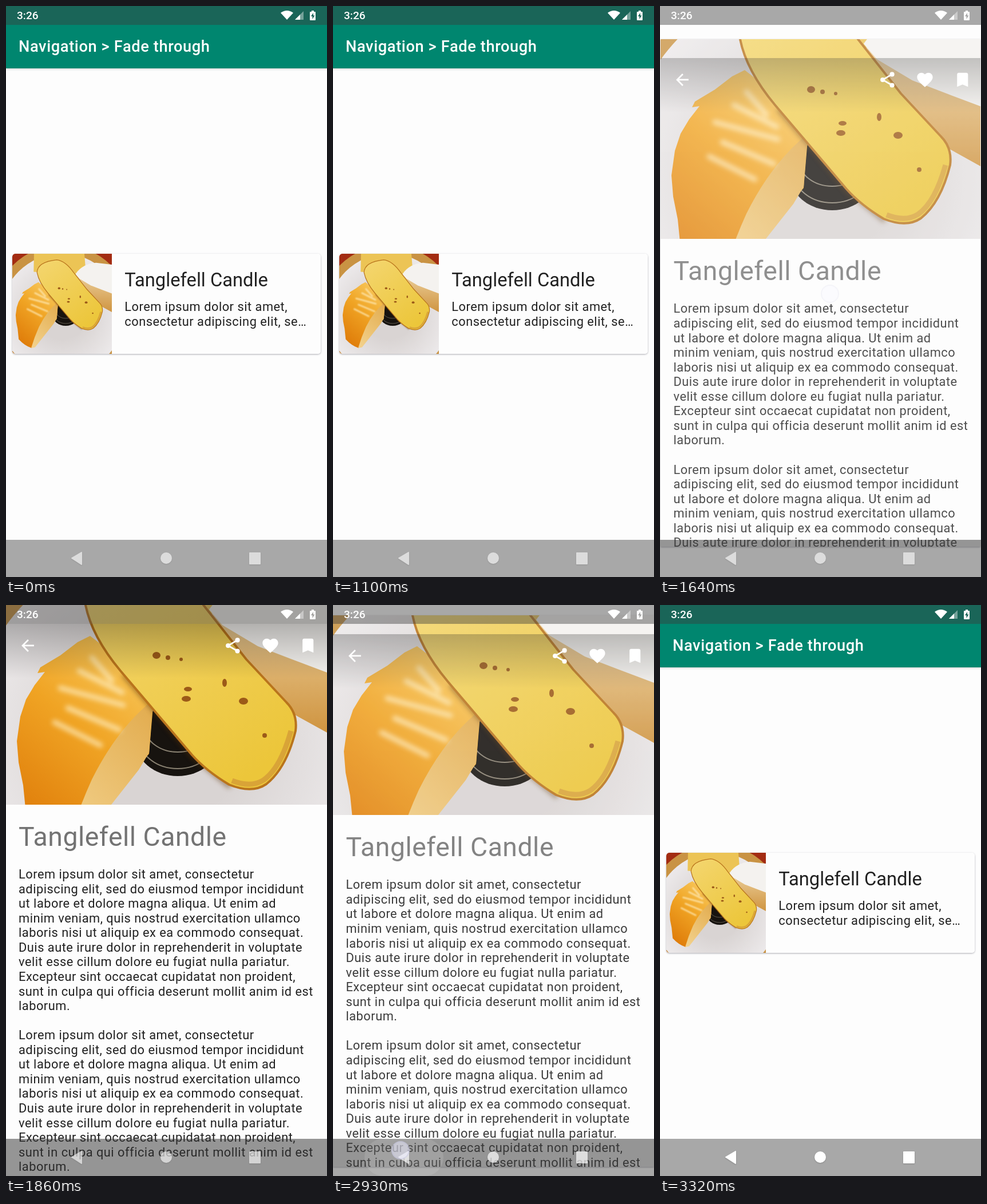
Recreate the animation shown at these times as an HTML page. Size 561x998 px, loop 3.58 s.

```html
<!DOCTYPE html>
<html lang="en">
<head>
<meta charset="utf-8">
<title>Fade through</title>
<style>
html, body { margin: 0; width: 100%; height: 100%; overflow: hidden; background: #fdfdfd; }
#stage { position: relative; width: 561px; height: 998px; overflow: hidden; font: 21.82px/1.172 Roboto, sans-serif; color: #212121; }
#stage div, #stage svg { position: absolute; }
.text { white-space: pre; letter-spacing: .5px; }
#bar { width: 561px; height: 109px; background: #00866f; box-shadow: 0 1px 4px #0003; }
#bar .text { left: 22px; top: 56px; font-size: 27.27px; font-weight: 500; letter-spacing: .0215em; color: #fff; }
#box { overflow: hidden; background: #fdfdfd; }
#edge { box-shadow: 0 1px 3px #3346; }
#card { width: 540px; height: 174.5px; border-radius: 5px; overflow: hidden; }
#card .name { left: 196.4px; top: 27px; font-size: 32.73px; letter-spacing: 0; }
#card .body { left: 196.4px; top: 80px; }
#detail { width: 561px; height: 998px; }
#detail .name { left: 22px; top: 377.5px; font-size: 46.36px; color: #737373; }
#detail .body { left: 22px; top: 458px; }
#scrim { top: 33px; width: 561px; height: 95px; background: linear-gradient(#0004, #0000); }
#shade { width: 561px; height: 70px; background: #0002; }
.system { width: 561px; background: rgba(59, 59, 59, .44); }
#clock { left: 19px; top: 5.5px; font-size: 19.1px; font-weight: 500; color: #fff; }
#ripple { left: 55px; top: 933px; width: 138px; height: 65px; border-radius: 33px; background: #ffffff1c; }
#dot { width: 28px; height: 28px; margin: -15px; border: 2px solid #c4c4e0a0; border-radius: 50%; background: #ececffb0; }
</style>
</head>
<body>
<div id="stage">
  <div id="bar"><div class="text">Navigation &gt; Fade through</div></div>
  <div id="edge"></div>
  <div id="box">
    <div id="card">
      <svg width="174.5" height="174.5" viewBox="0 -106 561 561"><use href="#cheese"/></svg>
      <div class="text name"></div>
      <div class="text body">Lorem ipsum dolor sit amet,
consectetur adipiscing elit, se…</div>
    </div>
    <div id="detail">
      <svg width="561" height="349" viewBox="0 0 561 349">
        <defs>
          <linearGradient id="rind" x1=".75" y1="0" x2=".2" y2="1"><stop stop-color="#f8c95e"/><stop offset=".45" stop-color="#f0a424"/><stop offset="1" stop-color="#de7a08"/></linearGradient>
          <linearGradient id="paste" x2=".7" y2="1"><stop stop-color="#f4d670"/><stop offset="1" stop-color="#ecc63a"/></linearGradient>
          <linearGradient id="side" x2="0" y2="1"><stop stop-color="#ecd09c"/><stop offset="1" stop-color="#cf9440"/></linearGradient>
          <linearGradient id="cut" x1=".8" y1="0" x2=".2" y2="1"><stop stop-color="#e3ae52"/><stop offset="1" stop-color="#f2d08a"/></linearGradient>
          <radialGradient id="plate"><stop offset=".4" stop-color="#d9d4d3"/><stop offset="1" stop-color="#ece9ea"/></radialGradient>
          <filter id="soft"><feGaussianBlur stdDeviation="4"/></filter>
          <g id="cheese">
            <path fill="#a32c12" d="M0-106h561v561H0z"/>
            <circle cx="279" cy="237" r="392" fill="#c99343"/>
            <circle cx="279" cy="237" r="344" fill="url(#plate)"/>
            <path fill="#ecc455" d="M122-106H405L415 20 120-5z"/>
            <ellipse cx="300" cy="235" rx="75" ry="64" fill="#17130f"/>
            <g fill="none" stroke="#8a8272" stroke-width="2">
              <ellipse cx="300" cy="229" rx="69" ry="57"/><ellipse cx="300" cy="212" rx="58" ry="45"/>
            </g>
            <path fill="url(#side)" d="M355 5L440 60 561 105V223L505 192 400 90z"/>
            <path fill="#f4f2ef" d="M355 8Q395-50 470-55L561-45V118L500 95 440 72 378 35z"/>
            <path fill="url(#rind)" d="M147 54L125 65 95 88 60 109 55 119 68 117 50 140 35 165 25 195 19 238 22 275 30 315 36 375Q70 412 108 424L250 260 258 165 200 95z"/>
            <path fill="url(#cut)" d="M257 166L250 258 232 288 128 420 106 424Q125 360 150 305 195 215 257 166z"/>
            <g fill="none" stroke="#fff0c4" stroke-width="9" stroke-linecap="round" opacity=".7" filter="url(#soft)">
              <path d="M95 145l110 30M85 205l80 40M108 180l90 38M128 115l75 38M150 92l35 40"/>
            </g>
            <path fill="none" stroke="#5a3008" stroke-width="8" opacity=".5" filter="url(#soft)" d="M205 122L258 182 328 266 392 318"/>
            <path fill="url(#paste)" stroke="#b9741c" stroke-width="4" stroke-linejoin="round" d="M139 0Q140-60 250-72 300-65 345 0L420 95 490 170Q510 190 506 220 490 285 455 313 430 330 390 314 350 290 325 262L200 115Q150 55 139 0z"/>
            <path fill="none" stroke="#d9a437" stroke-width="9" d="M498 220Q480 285 450 306 428 320 395 307"/>
            <g fill="#9c5a18">
              <ellipse cx="263" cy="88" rx="7" ry="6"/><circle cx="283" cy="92" r="4"/><circle cx="306" cy="95" r="3"/>
              <ellipse cx="382" cy="136" rx="4" ry="7"/><ellipse cx="318" cy="147" rx="7" ry="4"/>
              <ellipse cx="315" cy="164" rx="8" ry="5"/><ellipse cx="415" cy="168" rx="8" ry="6"/><circle cx="452" cy="228" r="4"/>
            </g>
          </g>
        </defs>
        <use href="#cheese"/>
      </svg>
      <div id="scrim"></div>
      <svg width="561" height="110" fill="#fff">
        <g transform="translate(21.6 54.6) scale(1.364)"><path d="M20 11H7.83l5.59-5.59L12 4l-8 8 8 8 1.41-1.41L7.83 13H20z"/></g>
        <g transform="translate(380 54.6) scale(1.364)"><path d="M18 5L6 12l12 7" fill="none" stroke="#fff" stroke-width="2"/><circle cx="18" cy="5" r="3"/><circle cx="6" cy="12" r="3"/><circle cx="18" cy="19" r="3"/></g>
        <g transform="translate(445.6 54.6) scale(1.364)"><path d="M12 21.35l-1.45-1.32C5.4 15.36 2 12.28 2 8.5 2 5.42 4.42 3 7.5 3c1.74 0 3.41.81 4.5 2.09C13.09 3.81 14.76 3 16.5 3 19.58 3 22 5.42 22 8.5c0 3.78-3.4 6.86-8.55 11.54z"/></g>
        <g transform="translate(511.4 54.6) scale(1.364)"><path d="M17 3H7c-1.1 0-2 .9-2 2v16l7-3 7 3V5c0-1.1-.9-2-2-2z"/></g>
      </svg>
      <div class="text name"></div>
      <div class="text body" id="story"></div>
    </div>
    <div id="shade"></div>
  </div>
  <div class="system" style="height:33px"></div>
  <div class="system" style="top:933px;height:65px"></div>
  <div id="clock">3:26</div>
  <svg width="561" height="33" fill="#fff">
    <path d="M480 12Q491 4 502 12L491 24z"/>
    <path d="M505 24L520 9V24z" opacity=".4"/><path d="M505 24L514 15V24z"/>
    <path fill-rule="evenodd" d="M534 8h4v2h2q1 0 1 1v13q0 1-1 1h-8q-1 0-1-1V11q0-1 1-1h2zM537 12l-4 6h2.5v5l4-6.500H537z"/>
  </svg>
  <div id="ripple"></div>
  <svg id="nav" width="561" height="998" fill="#fff" stroke="#fff" stroke-width="2" stroke-linejoin="round" style="filter:drop-shadow(0 1px 1px #0003)">
    <path d="M115 965L132 955V976z"/><circle cx="280" cy="965" r="9"/><path d="M426 956h18v19h-18z"/>
  </svg>
  <div id="dot"></div>
</div>
<script>
const $ = id => document.getElementById(id);
const LOOP = 3580, OPEN = 1465, OPEN_MS = 300, CLOSE = 2900, CLOSE_MS = 250;
const taps = [[1330, 296, 502], [2750, 117, 952]];

document.querySelectorAll('.name').forEach(el => el.textContent = 'Tanglefell Candle');
const para = `Lorem ipsum dolor sit amet, consectetur
adipiscing elit, sed do eiusmod tempor incididunt
ut labore et dolore magna aliqua. Ut enim ad
minim veniam, quis nostrud exercitation ullamco
laboris nisi ut aliquip ex ea commodo consequat.
Duis aute irure dolor in reprehenderit in voluptate
velit esse cillum dolore eu fugiat nulla pariatur.
Excepteur sint occaecat cupidatat non proident,
sunt in culpa qui officia deserunt mollit anim id est
laborum.`;
$('story').textContent = para + '\n\n' + para;

const clamp = x => Math.min(1, Math.max(0, x));
const mix = (a, b, p) => a + (b - a) * p;

// Cubic Bezier easing, solved by bisection
function bezier(x1, y1, x2, y2) {
  const at = (a, b, s) => 3 * (1 - s) ** 2 * s * a + 3 * (1 - s) * s * s * b + s ** 3;
  return x => {
    if (x <= 0) return 0;
    if (x >= 1) return 1;
    let lo = 0, hi = 1;
    for (let i = 0; i < 24; i++) {
      const mid = (lo + hi) / 2;
      if (at(x1, x2, mid) < x) lo = mid; else hi = mid;
    }
    return at(y1, y2, lo);
  };
}
const standard = bezier(.4, 0, .2, 1), accelerate = bezier(.4, 0, 1, 1), decelerate = bezier(0, 0, .2, 1);

function draw(t) {
  const closing = t >= CLOSE;
  const k = closing ? (t - CLOSE) / CLOSE_MS : (t - OPEN) / OPEN_MS;
  const eased = standard(k), p = closing ? 1 - eased : eased;
  const leaving = clamp(1 - eased / .35), entering = clamp((eased - .35) / .65);

  const left = mix(10.9, 0, p), top = mix(433.3, 0, p), bottom = mix(607.8, 998, p);
  for (const id of ['box', 'edge']) Object.assign($(id).style, {
    left: left + 'px', top: top + 'px', width: 561 - 2 * left + 'px',
    height: bottom - top + 'px', borderRadius: 5 * (1 - p) + 'px'
  });
  $('shade').style.top = 933 - top + 'px';
  $('card').style.opacity = closing ? entering : leaving;
  $('detail').style.opacity = closing ? leaving : entering;
  $('bar').style.opacity = closing ? decelerate(2 * k - 1) : 1 - accelerate(2 * k);

  $('nav').style.opacity = mix(.6, 1, clamp((t - CLOSE) / 150));
  $('ripple').style.opacity = Math.min(clamp((t - 2780) / 100), clamp((3320 - t) / 260));

  const [start, x, y] = taps[t < taps[1][0] ? 0 : 1], age = t - start;
  Object.assign($('dot').style, {
    left: x + 'px', top: y + 'px', opacity: age < 0 ? 0 : clamp(1 - (age - 130) / 230)
  });
}

const began = performance.now();
function tick() {
  draw((performance.now() - began) % LOOP);
  requestAnimationFrame(tick);
}
tick();
</script>
</body>
</html>
```
